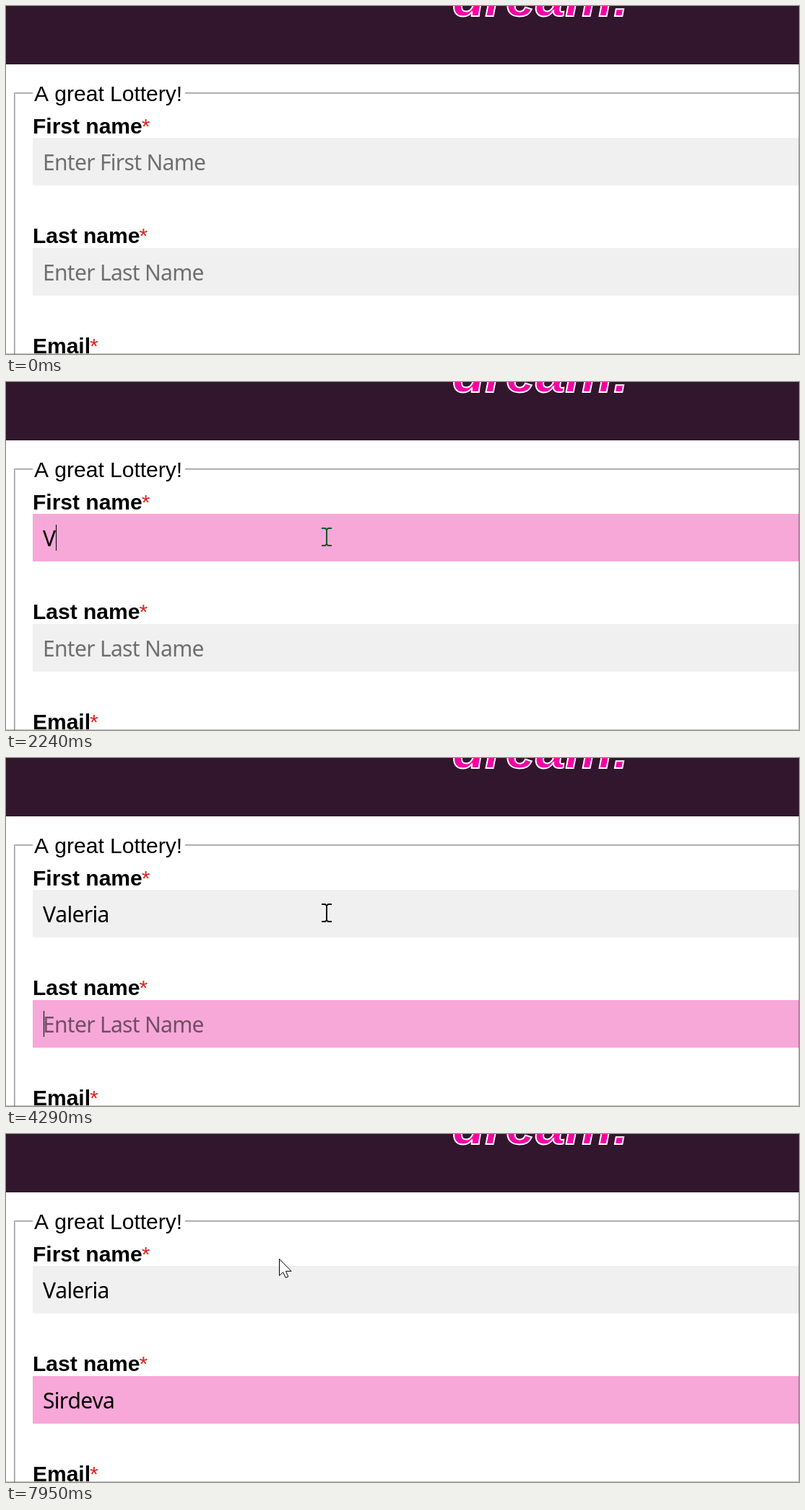
An HTML page that plays this animation: 1098 by 483 pixels, repeating every 8 s.

```html
<!DOCTYPE html>
<html lang="en">
<head>
<meta charset="utf-8">
<title>Lottery form</title>
<style>
  html, body { margin: 0; width: 100%; height: 100%; overflow: hidden; background: #fff; }
  svg { display: block; isolation: isolate; }
  text { font: 30px "Liberation Sans", Arial, sans-serif; font-kerning: none; }
  .label { font-weight: bold; }
  .star { font-weight: normal; fill: #d9251d; }
  .value { font-family: "Noto Sans", sans-serif; letter-spacing: -.7px; }
  .headline { font-size: 74px; font-weight: bold; font-style: italic; fill: #f500a5; stroke: #fff; stroke-width: 2px; }
  .beam { fill: none; stroke: #fff; stroke-width: 2; mix-blend-mode: difference; }
</style>
</head>
<body>
<svg width="1098" height="483" viewBox="0 0 1098 483">
  <rect width="1098" height="483" fill="#fff"/>
  <rect width="1098" height="81" fill="#32162d"/>
  <text class="headline" x="618" y="13.5">dream!</text>
  <g fill="none">
    <path d="M37 121.5H12.5V483M248 121.5H1098" stroke="#c8c8c8"/>
    <path d="M37 120.5H11.5V483M248 120.5H1098" stroke="#999"/>
  </g>
  <text x="39" y="132">A great Lottery!</text>
  <text class="label" x="37" y="177">First name<tspan class="star" dx="-1">*</tspan></text>
  <text class="label" x="37" y="329">Last name<tspan class="star" dx="-1">*</tspan></text>
  <text class="label" x="37" y="482">Email<tspan class="star" dx="-1">*</tspan></text>
  <g id="fields"></g>
  <rect id="caret" width="1" height="36"/>
  <path d="M1097.5 81V482.5H0" fill="none" stroke="#000" stroke-opacity=".24"/>
  <path id="beam" class="beam" d="M-7 -12H-2L0 -10L2 -12H7M0 -11V11M-7 12H-2L0 10L2 12H7"/>
  <path id="arrow" d="M.5 .5V23.5L5.7 18.8L9.2 26.5L12.8 25L9.4 17.4H17Z" fill="#fff" stroke="#000"/>
  <circle id="click" cx="441" cy="212" r="18" fill="#ff0"/>
</svg>
<script>
const DURATION = 8000;
const BLINK = 520, BLINK_START = 1165;
const CLICK = 1160, CLICK_END = 1430;
const MOVE_STEPS = 4;
const $ = id => document.getElementById(id);

const fields = [
  { top: 183, hint: 'Enter First Name', name: 'Valeria', focus: 1250, blur: 4285, typing: 2240, keyGap: 230 },
  { top: 336, hint: 'Enter Last Name', name: 'Sirdeva', focus: 4285, blur: DURATION, typing: 5280, keyGap: 265 }
];

// Each move follows a quadratic curve through start, control and end points.
const moves = [
  { from: 70, to: 360, x: [839, 600, 457], y: [359, 210, 140] },
  { from: 550, to: 830, x: [457, 450, 444], y: [140, 180, 215] },
  { from: 7150, to: 7690, x: [444, 390, 378], y: [215, -119, 173] }
];

function add(tag, attrs) {
  const node = document.createElementNS('http://www.w3.org/2000/svg', tag);
  for (const key in attrs) node.setAttribute(key, attrs[key]);
  return $('fields').appendChild(node);
}
function show(node, visible) {
  node.style.display = visible ? '' : 'none';
}
function within(t, from, to) {
  return t >= from && t < to;
}
function curve([a, b, c], p) {
  const q = 1 - p;
  return Math.round(q * q * a + 2 * q * p * b + p * p * c);
}

for (const f of fields) {
  f.box = add('rect', { x: 37, y: f.top, width: 1061, height: 66 });
  f.text = add('text', { class: 'value', x: 51, y: f.top + 45 });
}

function drawField(f, t) {
  const count = Math.max(0, Math.floor((t - f.typing) / f.keyGap) + 1);
  const typed = f.name.slice(0, count);
  const focused = within(t, f.focus, f.blur);
  f.box.setAttribute('fill', focused ? '#f7a8d8' : '#f0f0f0');
  f.text.textContent = typed || f.hint;
  f.text.setAttribute('fill-opacity', typed ? 1 : .54);
  if (focused) {
    const width = typed ? f.text.getComputedTextLength() : 0;
    $('caret').setAttribute('x', Math.round(52 + width));
    $('caret').setAttribute('y', f.top + 15);
  }
}

function drawPointer(t) {
  const move = moves.filter(m => m.from <= t).pop();
  let x = 0, y = 0;
  if (move) {
    const progress = Math.min(1, (t - move.from) / (move.to - move.from));
    const p = Math.floor(progress * MOVE_STEPS) / MOVE_STEPS;
    x = curve(move.x, p);
    y = curve(move.y, p);
  }
  const overField = fields.some(f => within(y, f.top, f.top + 66));
  show($('beam'), move && overField);
  show($('arrow'), move && !overField);
  for (const id of ['beam', 'arrow']) $(id).setAttribute('transform', `translate(${x} ${y})`);
}

function draw(now) {
  const t = now % DURATION;
  for (const f of fields) drawField(f, t);
  const blinkOn = Math.floor((t - BLINK_START) / BLINK) % 2 === 0;
  show($('caret'), t >= fields[0].focus && blinkOn);
  drawPointer(t);
  show($('click'), within(t, CLICK, CLICK_END));
  $('click').setAttribute('fill-opacity', Math.min(.5, (CLICK_END - t) / 360));
  requestAnimationFrame(draw);
}
draw(performance.now());
</script>
</body>
</html>
```
